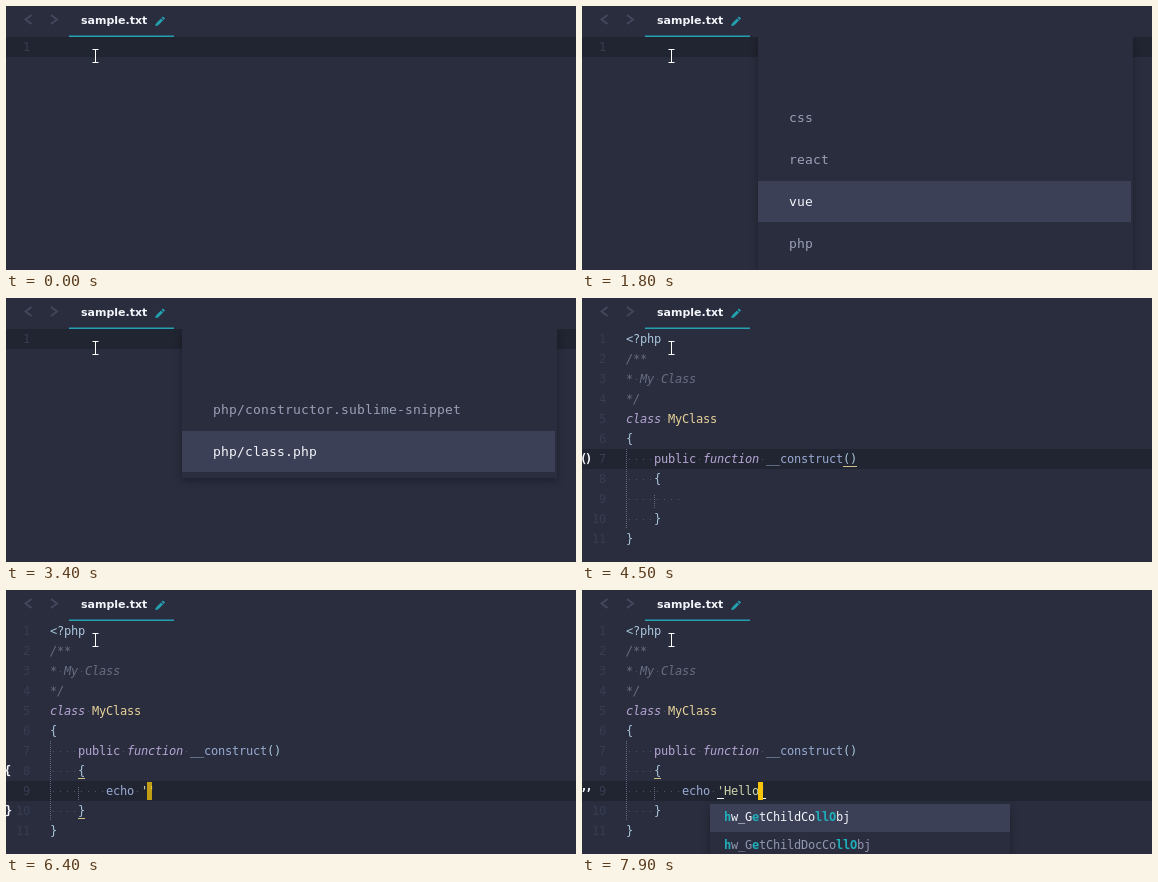
An HTML page with a canvas that plays this animation: 570 by 264 pixels, repeating every 8000 ms.

```html
<!DOCTYPE html>
<html lang="en">
<head>
<meta charset="utf-8">
<title>Editor snippet demo</title>
<style>
  html, body { margin: 0; width: 100%; height: 100%; overflow: hidden; background: #292d3e; }
  canvas { display: block; }
</style>
</head>
<body>
<canvas id="stage" width="570" height="264"></canvas>
<script>
const ctx = document.getElementById('stage').getContext('2d');
const LOOP = 8000, STEP = 100;
const CELL = 7, ROW = 20, LEFT = 44, TOP = 31;
const C = {
  bg: '#292d3e', line: '#212431', pick: '#3b4057', teal: '#25a0b1', caret: '#f7c40c',
  white: '#f4f5fa', text: '#a3a9c4', dim: '#383d51', dots: '#4d536c', note: '#686d82',
  word: '#b5a6d4', name: '#e8d29a', func: '#98abd2', sign: '#a9c5dc', str: '#cdd5ab', mark: '#cfc08a'
};
const MONO = '"DejaVu Sans Mono", monospace';
const CODE = '12px ' + MONO, ITALIC = 'italic 12px ' + MONO, BOLD = 'bold 12px ' + MONO;

// Each segment: text, colour, optional font
const SNIPPET = [
  [['<?php', C.sign]],
  [['/**', C.note, ITALIC]],
  [['* My Class', C.note, ITALIC]],
  [['*/', C.note, ITALIC]],
  [['class', C.word, ITALIC], [' MyClass', C.name]],
  [['{', C.sign]],
  [['    public ', C.word], ['function', C.word, ITALIC], [' __construct', C.func], ['()', C.sign]],
  [['    {', C.sign]],
  [['        ', C.text]],
  [['    }', C.sign]],
  [['}', C.sign]]
];

const TYPED = [
  [5500, 'e'], [5800, 'ec'], [5900, 'ech'], [6000, 'echo'], [6100, 'echo '], [6200, "echo '"],
  [7000, "echo 'H"], [7300, "echo 'He"], [7500, "echo 'Hel"], [7700, "echo 'Hell"], [7900, "echo 'Hello"]
];

// Completion lists; brackets mark the matched letters
const POPUPS = [
  [5600, { col: 8, w: 288, items: [['[e]cho', 'echo "…"'], ['[e]lseif', 'elseif …']] }],
  [5800, { col: 8, w: 288, items: [['[ec]ho', 'echo "…"']] }],
  [5900, { col: 8, w: 288, items: [['[ech]o', 'echo "…"']] }],
  [6000, { col: 8, w: 288, items: [['[echo]', 'echo "…"']] }],
  [6100, null],
  [7100, { col: 14, w: 288, items: [['[h]ash'], ['[h]eader']] }],
  [7400, { col: 14, w: 288, items: [['[he]ader'], ['[he]brev']] }],
  [7600, { col: 14, w: 300, items: [['[h]w_G[e]tChi[l]dren'], ['[h]w_G[e]tChi[l]dColl']] }],
  [7800, { col: 14, w: 300, items: [['[h]w_G[e]tChildCo[ll]Obj'], ['[h]w_G[e]tChildDocCo[llO]bj']] }],
  [7900, { col: 14, w: 300, items: [['[h]w_G[e]tChildCo[llO]bj'], ['[h]w_G[e]tChildDocCo[llO]bj']] }]
];

const LANGS = ['css', 'react', 'vue', 'php'];
const FILES = ['php/constructor.sublime-snippet', 'php/class.php'];
const PALETTE = [
  [1000, { items: LANGS, pick: 0 }], [1600, { items: LANGS, pick: 1 }],
  [1800, { items: LANGS, pick: 2 }], [2000, { items: LANGS, pick: 3 }],
  [2200, { items: FILES, pick: 0 }], [3400, { items: FILES, pick: 1 }], [3600, null]
];

const CARET = [
  [0, 0], [400, 0], [800, 1], [1100, 1], [1500, 0], [2190, 0], [2200, 1], [2700, 1], [3000, 0],
  [3590, 0], [3600, 1], [4200, 1], [4500, 0], [4690, 0], [4700, 1], [4900, 1], [5300, 0],
  [5490, 0], [5500, 1], [6300, 1], [6700, 0], [6990, 0], [7000, 1], [LOOP, 1]
];

function latest(track, t, none) {
  let value = none;
  for (const [at, v] of track) if (t >= at) value = v;
  return value;
}

function blend(track, t) {
  const i = track.findIndex(k => k[0] > t);
  const [t0, a] = track[i - 1], [t1, b] = track[i];
  return a + (b - a) * (t - t0) / (t1 - t0);
}

function box(x, y, w, h, color) {
  ctx.fillStyle = color;
  ctx.fillRect(x, y, w, h);
}

function path(points, color, width) {
  ctx.strokeStyle = color;
  ctx.lineWidth = width;
  ctx.beginPath();
  points.forEach(([x, y]) => ctx.lineTo(x, y));
  ctx.stroke();
}

// Monospaced text on a whole-pixel grid
function grid(text, x, y, color, font, cell = CELL) {
  ctx.font = font;
  ctx.fillStyle = color;
  [...text].forEach((ch, i) => ctx.fillText(ch, x + i * cell, y));
  return x + text.length * cell;
}

function card(x, y, w, h) {
  ctx.save();
  ctx.shadowColor = 'rgba(0,0,0,.3)';
  ctx.shadowBlur = 8;
  ctx.shadowOffsetY = 3;
  box(x, y, w, h, C.bg);
  ctx.restore();
}

const baseline = row => 25 + row * ROW;
const rowTop = row => TOP + (row - 1) * ROW;

function drawCaret(x, y, w, h, alpha) {
  ctx.globalAlpha = alpha;
  box(x, y, w, h, C.caret);
  ctx.globalAlpha = 1;
}

function drawTab() {
  path([[25.5, 9], [19.5, 13.5], [25.5, 18]], '#42475c', 2);
  path([[45, 9], [51, 13.5], [45, 18]], '#42475c', 2);
  ctx.font = 'bold 11px "DejaVu Sans", sans-serif';
  ctx.fillStyle = C.white;
  ctx.fillText('sample.txt', 75, 18);
  path([[151, 18.5], [156, 13.5]], C.teal, 3);
  path([[156.6, 12.9], [158, 11.5]], C.teal, 3);
  box(149.5, 18, 2, 2, C.teal);
  box(63, 29.5, 105, 1.5, C.teal);
}

function drawLine(segments, row) {
  let x = LEFT;
  for (const [text, color, font = CODE] of segments) {
    [...text].forEach((ch, i) => {
      if (ch === ' ') box(x + i * CELL + 3, baseline(row) - 4, 1, 1, C.dots);
    });
    x = grid(text, x, baseline(row), color, font);
  }
}

function drawGuide(x, top, bottom) {
  for (let y = top; y < bottom; y += 2) box(x, y, 1, 1, '#626881');
}

function typedSegments(typed) {
  const [cmd, str] = typed.split("'");
  const parts = [['        ', C.text], [cmd, cmd.length > 3 ? C.func : C.text]];
  if (str !== undefined) parts.push(["'" + str + "'", C.str]);
  return parts;
}

function underline(col, row, color = C.mark) {
  box(LEFT + col * CELL, baseline(row) + 3, CELL, 1, color);
}

function drawBrackets(t, end) {
  if (t < 4700) {
    grid('()', -2, baseline(7), C.white, BOLD, 5);
    underline(31, 7);
    underline(32, 7);
  } else if (t < 7400) {
    grid('{', -2, baseline(8), C.white, BOLD);
    grid('}', -1, baseline(10), C.white, BOLD);
    underline(4, 8);
    underline(4, 10);
  } else {
    grid('’’', -2, baseline(9) + 3, C.white, BOLD, 5);
    underline(4, 8);
    underline(13, 9, C.white);
    underline(end, 9, C.white);
  }
}

function drawEditor(t, alpha) {
  const filled = t >= 3600;
  const typed = latest(TYPED, t, '');
  const active = !filled ? 1 : t < 4700 ? 7 : 9;
  const col = active === 1 ? 0 : active === 7 ? 32 : 8 + typed.length;
  box(0, rowTop(active), 570, ROW, C.line);
  const count = filled ? SNIPPET.length : 1;
  for (let row = 1; row <= count; row++) {
    const label = String(row);
    grid(label, 24 - label.length * CELL, baseline(row), C.dim, CODE);
    if (filled) drawLine(row === 9 ? typedSegments(typed) : SNIPPET[row - 1], row);
  }
  if (filled) {
    drawGuide(LEFT, rowTop(7), rowTop(11));
    drawGuide(LEFT + 4 * CELL, rowTop(9) + 6, rowTop(10));
    drawBrackets(t, col);
  }
  if (t < 1000 || filled) drawCaret(LEFT - 1 + col * CELL, rowTop(active) + 1, 5, 18, alpha);
}

function drawPopup({ col, w, items }) {
  const textX = LEFT + col * CELL, x = textX - 14, y = 214, h = 28;
  card(x, y, w, items.length * h);
  box(x, y, w, h, C.pick);
  items.forEach(([label, hint = ''], i) => {
    const base = y + 17 + i * h, color = i ? '#9298b2' : C.white;
    let pen = textX;
    label.split(/[\[\]]/).forEach((part, n) => {
      pen = n % 2 ? grid(part, pen, base, '#20aebb', BOLD) : grid(part, pen, base, color, CODE);
    });
    grid(hint, 304, base, color, ITALIC);
  });
}

function drawPalette({ items, pick }, alpha) {
  const x = 176, w = 373, h = 42, first = 91;
  card(x, TOP, w + 2, first - TOP + items.length * h + 5);
  box(x, first + pick * h, w, h - 1, C.pick);
  items.forEach((item, i) =>
    grid(item, 207, first + 25 + i * h, i === pick ? C.white : '#9ba0b8', '13px ' + MONO, 8));
  drawCaret(208, 52, 5, 26, alpha);
}

function drawPointer() {
  path([[89.5, 44], [89.5, 56]], '#fff', 1);
  for (const y of [43.5, 56.5]) path([[86.5, y], [92.5, y]], '#fff', 1);
}

function draw(now) {
  const t = Math.floor(now % LOOP / STEP) * STEP;
  const alpha = blend(CARET, t);
  const palette = latest(PALETTE, t, null), popup = latest(POPUPS, t, null);
  box(0, 0, 570, 264, C.bg);
  drawEditor(t, alpha);
  if (popup) drawPopup(popup);
  if (palette) drawPalette(palette, alpha);
  box(0, 0, 570, TOP, C.bg);
  drawTab();
  drawPointer();
}

const start = performance.now();
function tick() {
  draw(performance.now() - start);
  requestAnimationFrame(tick);
}
tick();
</script>
</body>
</html>
```
